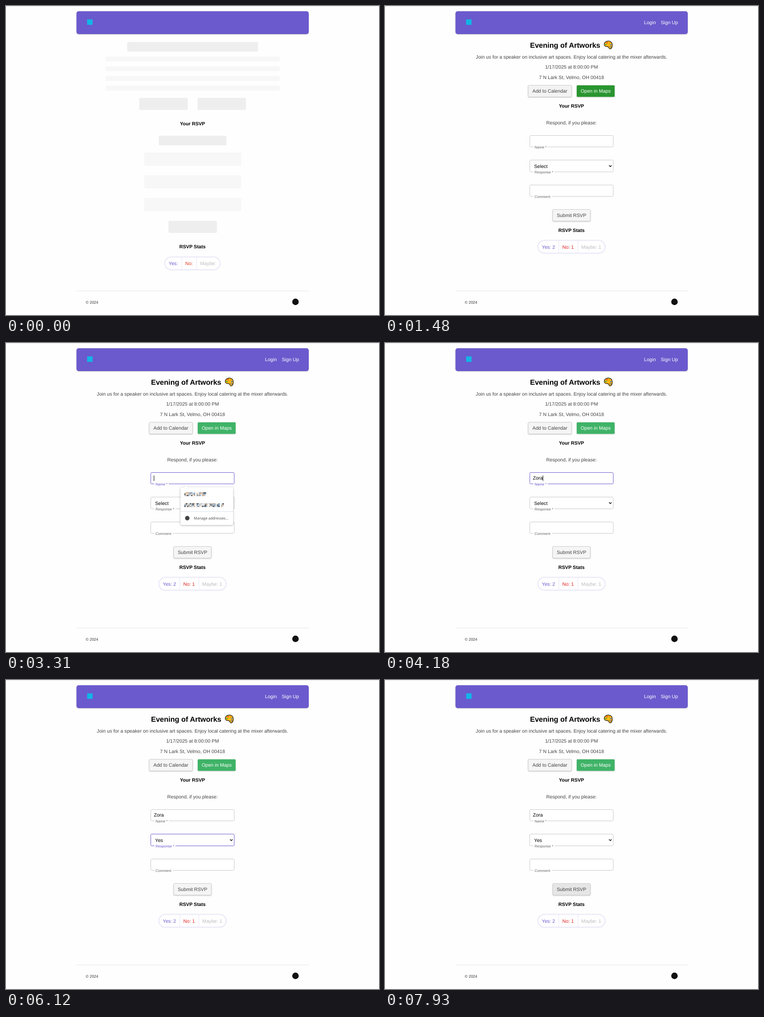
Animation of 823 by 681 pixels, one loop 8 s. Source, as an HTML page:

```html
<!DOCTYPE html>
<html lang="en">
<head>
<meta charset="utf-8">
<title>Event RSVP</title>
<style>
  html, body { margin: 0; width: 100%; height: 100%; overflow: hidden; background: #fefefe; }
  svg { display: block; }
  text { font: 10.667px "Liberation Sans", Arial, sans-serif; fill: #444; text-rendering: geometricPrecision; white-space: pre; }
  .mid { text-anchor: middle; }
  .bold { font-weight: bold; fill: #000; }
  .title { font-size: 16px; }
  .small { font-size: 8px; fill: #666; }
  .value { fill: #000; }
  .light { fill: #fff; }
  .field { fill: #fff; stroke: #c8c8c8; }
  .raised { filter: drop-shadow(0 1px 1px rgba(0, 0, 0, .2)); }
  .popup { filter: drop-shadow(0 1px 2px rgba(0, 0, 0, .3)); }
</style>
</head>
<body>
<svg id="stage" width="823" height="681" viewBox="0 0 823 681"></svg>
<script>
const LOOP = 8000, STEP = 70;
const ACCENT = 'slateblue', FIELD_LINE = '#c8c8c8', LABEL = '#666';
const TYPED = 'Zora', KEY_TIMES = [3710, 3910, 4050, 4180];

const box = (x, y, w, h, fill, r = 2.7, extra = '') =>
  `<rect x="${x}" y="${y}" width="${w}" height="${h}" rx="${r}" fill="${fill}" ${extra}/>`;
const label = (x, y, text, cls = '', extra = '') =>
  `<text x="${x}" y="${y}" class="${cls}" ${extra}>${text}</text>`;
const centered = (y, text, cls = '') => label(411.5, y, text, 'mid ' + cls);

function button(id, x, y, w, text, fill, line, cls = '') {
  return box(x, y, w, 25.5, fill, 2, `id="${id}" class="raised" stroke="${line}"`) +
    label(x + w / 2, y + 16.6, text, 'mid ' + cls);
}

function field(id, y, h, caption, notch) {
  return `<g id="${id}">
    <rect class="field" x="319.5" y="${y}" width="184" height="${h}" rx="2"/>
    <rect x="327" y="${y + h - 2}" width="${notch}" height="4" fill="#fefefe"/>
    ${label(330, y + h + 3.8, caption, 'small')}</g>`;
}

function stats(id, y, left, width, dividers, textX, counts, red) {
  const colors = [ACCENT, red, '#bbb'];
  const words = ['Yes:', 'No:', 'Maybe:'];
  return `<g id="${id}">` +
    box(left + 1.3, y + 1.3, width - 2.6, 28.4, '#fff', 14.2, 'stroke="#ecebf8" stroke-width="2.6"') +
    dividers.map(x => box(x - .7, y + 2, 1.4, 27, '#ecebf8', 0)).join('') +
    words.map((word, i) => label(textX[i], y + 19.4, word + counts[i], '', `style="fill:${colors[i]}"`)).join('') +
    '</g>';
}

const emptyStats = (id, y) =>
  stats(id, y, 349, 124.5, [388, 420.6], [359, 395.5, 428.5], ['', '', ''], '#dc3a1e');

// Pixelated, unreadable entry in the suggestion list
function mosaic(x, y, columns, seed) {
  const palette = ['#3f4650', '#7396b5', '#c9a98b', '#dfe6ee', '#a9b4bf', '#f3e3cf'];
  let cells = '';
  for (let i = 0; i < columns * 3; i++) {
    seed = (seed * 16807) % 2147483647;
    const col = i % columns, row = Math.floor(i / columns);
    if (col % 9 < 8) cells += box(x + col * 3, y + row * 2.8, 3, 2.8, palette[seed % 6], 0);
  }
  return cells;
}

const palette = `<g stroke="#111" stroke-width="1.2">
  <path fill="#ffb914" d="M483.7 85C483.5 80 488 77.2 493 77.2C498.5 77.2 501.6 81 501.6 86C501.6 91 499.5 95 496 94.5C493 94 495 90.5 491.5 89.7C488 89 483.8 90 483.7 85Z"/>
  <circle cx="497.5" cy="90" r="1.5" fill="#fff" stroke-width=".8"/></g>
  <circle cx="487.3" cy="84.8" r="1.6" fill="#16a34a"/>
  <circle cx="490" cy="80.9" r="1.6" fill="#e8402a"/>
  <circle cx="495.3" cy="81" r="1.5" fill="#e88a00"/>
  <circle cx="498.3" cy="85" r="1.6" fill="#3478d4"/>`;

const skeleton = `<g id="skeleton">` +
  box(267.5, 79.5, 288.5, 21, '#eee') +
  [0, 1, 2, 3].map(i => box(219.5, 111.5 + i * 21.4, 384.5, 10.7, '#f7f7f7')).join('') +
  box(294, 202.5, 107, 26.5, '#eee') + box(422.5, 202.5, 107, 26.5, '#eee') +
  centered(263, 'Your RSVP', 'bold') +
  box(337, 285.7, 149.5, 21.4, '#eee') +
  [0, 1, 2].map(i => box(305, 323 + i * 50, 214, 29, '#f7f7f7')).join('') +
  box(358.5, 473.5, 107, 26.5, '#eee') +
  centered(534.3, 'RSVP Stats', 'bold') +
  emptyStats('loadingStats', 551.7) + '</g>';

const popup = `<g id="popup"><path class="popup" fill="#fff" d="M389 318h4l4-3.5 4 3.5h96q4 0 4 4v75q0 4-4 4h-108q-4 0-4-4v-75q0-4 4-4z"/>` +
  mosaic(393.5, 329, 16, 71) + mosaic(393.5, 353, 29, 905) +
  box(385, 371, 116, 1, '#d9e0ea', 0) +
  '<circle cx="400" cy="386" r="4.9" fill="#444"/>' +
  label(414.5, 389, 'Manage addresses...', 'small', 'style="font-family:\'Open Sans\',sans-serif;fill:#444"') + '</g>';

const page = `<g id="page">` +
  label(571.5, 40, 'Login', 'light') + label(608.5, 40, 'Sign Up', 'light') +
  label(320, 91.5, 'Evening of Artworks', 'bold title') + palette +
  centered(115.6, 'Join us for a speaker on inclusive art spaces. Enjoy local catering at the mixer afterwards.') +
  centered(138.3, '1/17/2025 at 8:00:00 PM') +
  centered(161, '7 N Lark St, Velmo, OH 00418') +
  button('calendar', 316, 174.8, 95.7, 'Add to Calendar', '#f5f5f5', '#ccc') +
  button('maps', 423, 174.8, 83.7, 'Open in Maps', '#3fb367', 'none', 'light') +
  centered(223.5, 'Your RSVP', 'bold') +
  centered(261.3, 'Respond, if you please:') +
  field('name', 285.5, 25, 'Name *', 32) +
  field('response', 339.5, 26, 'Response *', 47) +
  field('comment', 394.5, 25, 'Comment', 41) +
  label(326.3, 301.3, '', 'value', 'id="typed"') +
  label(329, 356.5, '', 'value', 'id="choice"') +
  '<path d="M494.3 351.2l2.8 2.8 2.8-2.8" fill="none" stroke="#000" stroke-width="1.4"/>' +
  button('submit', 370, 448.5, 83, 'Submit RSVP', '#f5f5f5', '#ccc') +
  centered(498.3, 'RSVP Stats', 'bold') +
  emptyStats('emptyStats', 515.2) +
  stats('fullStats', 515.2, 336, 151, [383.5, 425.5], [346, 391.3, 433], [' 2', ' 1', ' 1'], '#e02020') +
  box(326, 292, 1, 12, '#000', 0, 'id="nameCaret"') +
  box(326, 401, 1, 12, '#000', 0, 'id="commentCaret"') +
  popup + '</g>';

const $ = id => document.getElementById(id);
$('stage').innerHTML =
  box(0, 0, 823, 1, '#e6e6e6', 0) +
  box(155.5, 11.5, 512.5, 50.5, ACCENT, 5, 'class="raised"') +
  box(179, 29.5, 12, 12, '#12b5e5', 0) +
  skeleton + page +
  box(155.5, 627.5, 512.5, 1, '#e6e6e6', 0) +
  label(176, 655.5, '© 2024', '', 'style="font-size:8.533px;fill:#333"') +
  '<circle cx="638.7" cy="652" r="7.2" fill="#111"/>';

// Eased 0..1 transition advancing in discrete screen updates
function ramp(t, start, steps = 3) {
  const done = Math.max(0, Math.min(1, (Math.floor((t - start) / STEP) + 1) / steps));
  return 1 - (1 - done) ** 2;
}
const during = (t, from, to) => ramp(t, from) - ramp(t, to);
const blend = (from, to, k) => `color-mix(in srgb, ${to} ${k * 100}%, ${from})`;
const between = (t, from, to) => t >= from && t < to;
const show = (id, visible) => { $(id).style.display = visible ? '' : 'none'; };

function setFocus(id, k) {
  $(id).querySelector('.field').style.stroke = blend(FIELD_LINE, ACCENT, k);
  $(id).querySelector('text').style.fill = blend(LABEL, ACCENT, k);
}
const setHover = (id, from, to, k) => { $(id).style.fill = blend(from, to, k); };

function render(t) {
  show('skeleton', t < 340);
  show('page', t >= 340);
  show('emptyStats', t < 610);
  show('fullStats', t >= 610);

  setHover('calendar', '#f5f5f5', '#e6e6e6', during(t, 870, 1410));
  setHover('maps', '#3fb367', '#269129', during(t, 1410, 1820));
  setHover('submit', '#f5f5f5', '#e6e6e6', ramp(t, 7790));

  setFocus('name', during(t, 2220, 4640));
  setFocus('response', during(t, 4640, 6850));
  setFocus('comment', during(t, 6920, 7730));

  $('popup').style.opacity = t < 3710 ? ramp(t, 2360) : 1 - ramp(t, 3710, 2);

  $('typed').textContent = TYPED.slice(0, KEY_TIMES.filter(time => t >= time).length);
  $('choice').textContent = t < 6120 ? 'Select' : 'Yes';
  if (t >= 340) $('nameCaret').setAttribute('x', 326 + Math.round($('typed').getComputedTextLength()));
  show('nameCaret', between(t, 2220, 2780) || between(t, 3310, 4640));
  show('commentCaret', between(t, 6920, 7390));
}

const begin = performance.now();
function tick() {
  render((performance.now() - begin) % LOOP);
  requestAnimationFrame(tick);
}
tick();
</script>
</body>
</html>
```
